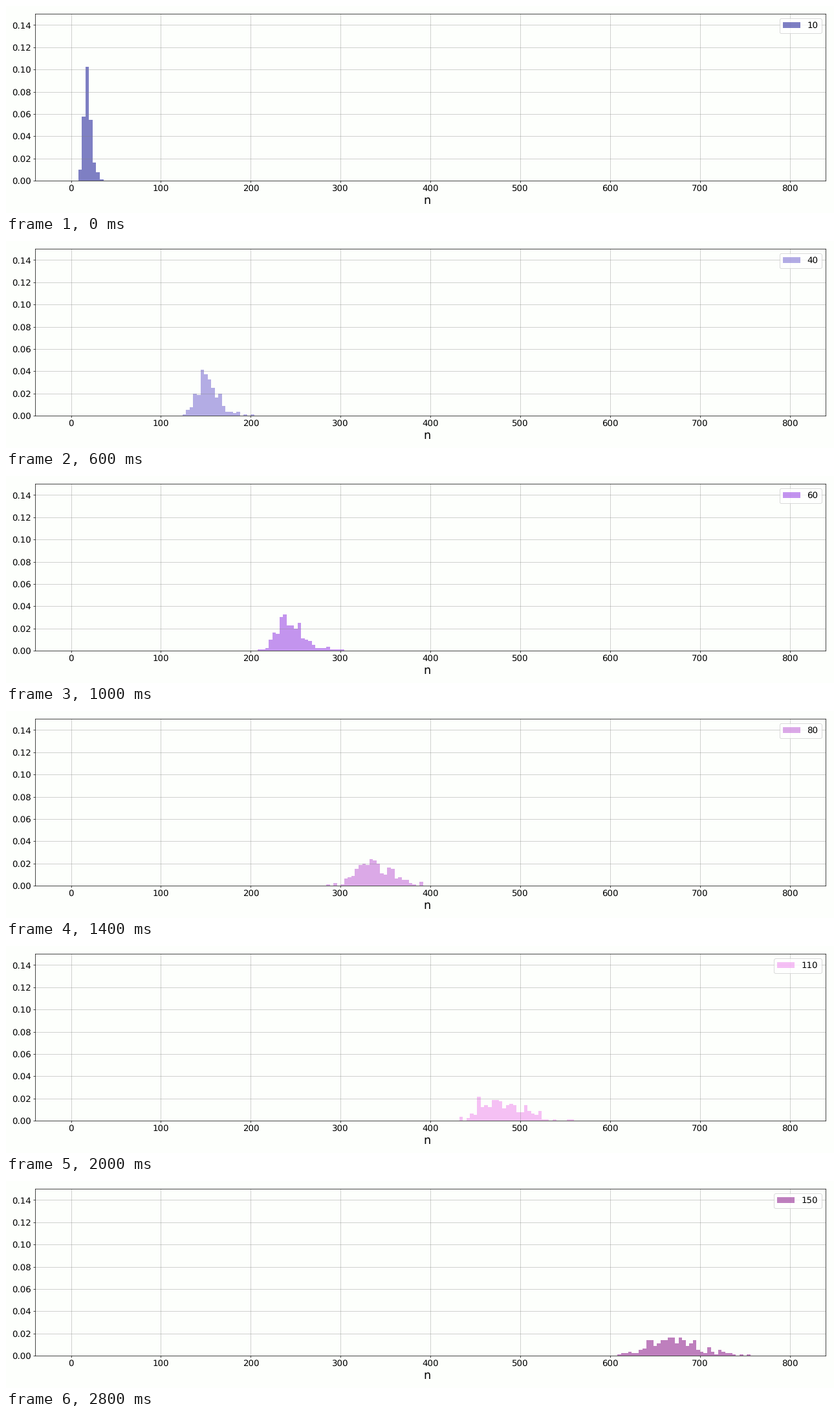
A matplotlib script for the animation above (3000 ms loop, 1280 by 320 pixels).

```python
import matplotlib.pyplot as plt
import numpy as np
from matplotlib.animation import FuncAnimation

W, H, DPI = 1280, 320, 64
LEFT, RIGHT, TOP, BOTTOM = 45, 1267.3, 12.3, 270
BIN, TOTAL = 4, 200
PAPER = "#fdfffc"
COLORS = ["darkblue", "mediumblue", "blue", "slateblue", "mediumpurple",
          "blueviolet", "darkorchid", "mediumorchid", "thistle", "plum",
          "violet", "orchid", "magenta", "darkmagenta", "purple"]

edges = np.arange(0, 800 + BIN, BIN)


def density(n):
    """Histogram of a slightly skewed sample that drifts and widens with n."""
    mean = np.interp(n, [10, 40, 80, 150], [18.6, 153, 338, 672])
    spread = 2.6 * np.sqrt(n) - 4
    z = np.random.default_rng(n).gamma(16, size=TOTAL)
    z = (z - z.mean()) / z.std()
    return np.histogram(mean + spread * z, edges)[0] / (TOTAL * BIN)


plt.rcParams.update({"font.family": "DejaVu Sans", "text.hinting": "no_hinting"})
fig = plt.figure(figsize=(W / DPI, H / DPI), dpi=DPI, facecolor=PAPER)
ax = fig.add_axes([LEFT / W, 1 - BOTTOM / H, (RIGHT - LEFT) / W,
                   (BOTTOM - TOP) / H], facecolor=PAPER)
bars = ax.bar(edges[:-1], np.zeros(len(edges) - 1), width=BIN, align="edge",
              alpha=0.5)
ax.set_xlim(-40, 840)
ax.set_ylim(0, 0.15)
ax.set_xticks(range(0, 801, 100))
ax.set_yticks(np.arange(8) * 0.02)
ax.tick_params(labelsize=15)
ax.set_xlabel("n", fontsize=20, x=0.496)
ax.grid(True, color="gray", alpha=0.5)


def update(i):
    n = 10 * (i + 1)
    for bar, height in zip(bars, density(n)):
        bar.set_height(height)
        bar.set_facecolor(COLORS[i])
    bars.set_label(str(n))
    ax.legend(loc="upper right", fontsize=15)
    return []


anim = FuncAnimation(fig, update, frames=15, interval=200, repeat=True,
                     repeat_delay=0)
plt.show()
```
